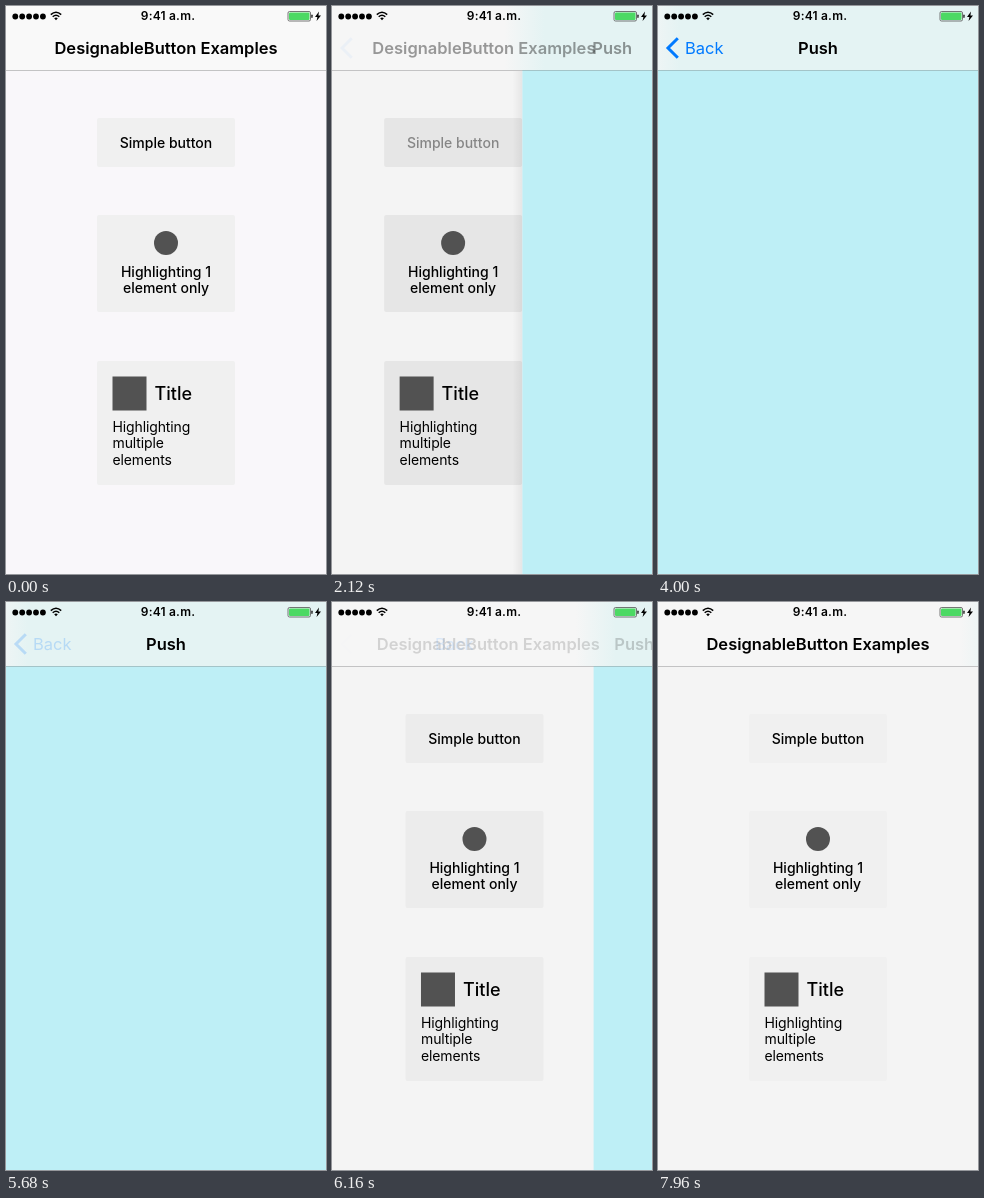
Recreate the animation shown at these times as an HTML page with a canvas. Size 320 by 568 pixels, loop 8000 ms.

```html
<!DOCTYPE html>
<html lang="en">
<head>
<meta charset="utf-8">
<title>Button examples</title>
<style>
html, body { margin: 0; width: 100%; height: 100%; overflow: hidden; background: #f9f7fa; }
canvas { display: block; width: 320px; height: 568px; }
</style>
</head>
<body>
<canvas id="stage"></canvas>
<script>
const LOOP = 8000, TAP = 1560, PUSH = 1938, BACK_TAP = 5400, POP = 5751;
const canvas = document.getElementById('stage');
const ctx = canvas.getContext('2d');
const dpr = window.devicePixelRatio || 1;
canvas.width = 320 * dpr;
canvas.height = 568 * dpr;

const clamp = v => Math.max(0, Math.min(1, v));
const gray = v => `rgb(${v},${v},${v})`;
// critically damped spring, t in seconds
const spring = t => t <= 0 ? 0 : 1 - (1 + 7.6 * t) * Math.exp(-7.6 * t);
const fadeIn = t => clamp((t - .3) / .75);
const fadeOut = t => Math.exp(-5.2 * Math.max(0, t));

function rect(x, y, w, h, color, r = 0) {
  ctx.fillStyle = color;
  ctx.beginPath();
  ctx.roundRect(x, y, w, h, r);
  ctx.fill();
}

function disc(x, y, r, color) {
  ctx.fillStyle = color;
  ctx.beginPath();
  ctx.arc(x, y, r, 0, 7);
  ctx.fill();
}

function stroke(path, color, width) {
  ctx.strokeStyle = color;
  ctx.lineWidth = width;
  ctx.stroke(new Path2D(path));
}

function text(str, x, y, { size = 14, weight = 500, align = 'center', color = '#000', alpha = 1, space = 0 } = {}) {
  if (alpha <= 0) return;
  ctx.globalAlpha = alpha;
  ctx.font = `${weight} ${size}px Inter, Roboto, sans-serif`;
  ctx.letterSpacing = space + 'px';
  ctx.textAlign = align;
  ctx.fillStyle = color;
  ctx.fillText(str, x, y);
  ctx.globalAlpha = 1;
}

function list(ms, c) {
  const bg = ms < PUSH ? '#f9f7fa' : gray(244 - 28 * Math.max(0, c - .4));
  rect(0, 0, 320, 568, bg);
  ctx.save();
  ctx.translate(-96 * c, 0);
  const fill = gray(240 * (1 - .1 * c));
  for (const [y, h] of [[112, 49], [209, 97], [355, 124]]) rect(91, y, 138, h, fill, 2);
  text('Simple button', 160, 141.5, { color: ms >= TAP && ms < POP ? '#868686' : '#000' });
  disc(160, 237, 12, '#525252');
  text('Highlighting 1', 160, 271);
  text('element only', 160, 287);
  rect(106.5, 370.5, 34, 34, '#525252');
  text('Title', 148.5, 394, { size: 18, align: 'left' });
  ['Highlighting', 'multiple', 'elements'].forEach((line, i) =>
    text(line, 106.5, 426 + 16.3 * i, { weight: 400, align: 'left', space: -.12 }));
  ctx.restore();
}

function cover(ms, c) {
  if (c <= 0) return;
  const edge = 320 * (1 - c);
  if (ms < POP) {
    const shade = ctx.createLinearGradient(edge - 10, 0, edge, 0);
    shade.addColorStop(0, 'rgba(0,0,0,0)');
    shade.addColorStop(1, `rgba(0,0,0,${.24 * c * (1 - c)})`);
    rect(edge - 10, 0, 10, 568, shade);
  }
  rect(edge, 0, 320, 568, '#beeff6');
}

function statusBar() {
  for (let i = 0; i < 5; i++) disc(9.3 + 6.9 * i, 10.5, 2.9, '#000');
  stroke('M44.8 8.6Q50 3.8 55.2 8.6M46.7 10.8Q50 7.7 53.3 10.8', '#000', 1.5);
  ctx.fillStyle = '#000';
  ctx.fill(new Path2D('M48.2 12.2Q50 10.7 51.8 12.2L50 14.2Z'));
  text('9:41 a.m.', 162, 14.3, { size: 12, weight: 600, space: .2 });
  stroke('M283.5 5.5H303Q304.5 5.5 304.5 7V13.5Q304.5 15 303 15H283.5Q282 15 282 13.5V7Q282 5.5 283.5 5.5Z', '#555', .8);
  rect(283, 6.5, 20.5, 7.5, '#4cd964', 1);
  rect(305.2, 8.5, 1.5, 3.5, '#333', 1);
  ctx.fillStyle = '#000';
  ctx.fill(new Path2D('M313 5.5L309 11H311.4L310.6 15L315 9.4H312.4Z'));
}

function navBar(ms, c) {
  const away = 1 - c, edge = 320 * away, popping = ms >= POP;
  const t = (ms - (popping ? POP : PUSH)) / 1000;
  rect(0, 0, 320, 64, ms < PUSH ? '#f9f9f9' : '#f6f6f6');
  if (c > 0) {
    const tint = ctx.createLinearGradient(edge - 18, 0, edge + 22, 0);
    tint.addColorStop(0, 'rgba(228,243,243,0)');
    tint.addColorStop(1, 'rgb(228,243,243)');
    rect(0, 0, 320, 64, tint);
  }
  rect(0, 64, 320, 1, '#c3c3c4');
  if (c > 0) rect(edge, 64, 320, 1, '#a3c4c8');

  const heading = { size: 16.5, weight: 600 };
  text('DesignableButton Examples', 160 - 20 * c, 48, {
    ...heading, alpha: popping ? fadeIn(t) : fadeOut(t)
  });
  if (c > 0) {
    const travel = popping ? 174 * away : 230 * away ** 1.25;
    text('Push', 160 + travel, 48, { ...heading, alpha: c });
    const pressed = ms >= BACK_TAP;
    const label = popping ? Math.min(.2, fadeOut(t)) : pressed ? .2 : fadeIn(t);
    text('Back', 27 + 93 * away, 48, {
      size: 16.5, weight: 400, align: 'left', color: '#007aff', alpha: label
    });
    ctx.globalAlpha = pressed ? label * c * c : fadeIn(t + .15);
    stroke('M19.8 32.3L10 42L19.8 51.7', '#007aff', 3);
    ctx.globalAlpha = 1;
  }
  statusBar();
}

function draw() {
  const ms = performance.now() % LOOP;
  const c = ms < POP ? spring((ms - PUSH) / 1000) : 1 - spring((ms - POP) / 1000);
  ctx.setTransform(dpr, 0, 0, dpr, 0, 0);
  list(ms, c);
  cover(ms, c);
  navBar(ms, c);
  requestAnimationFrame(draw);
}
requestAnimationFrame(draw);
</script>
</body>
</html>
```
